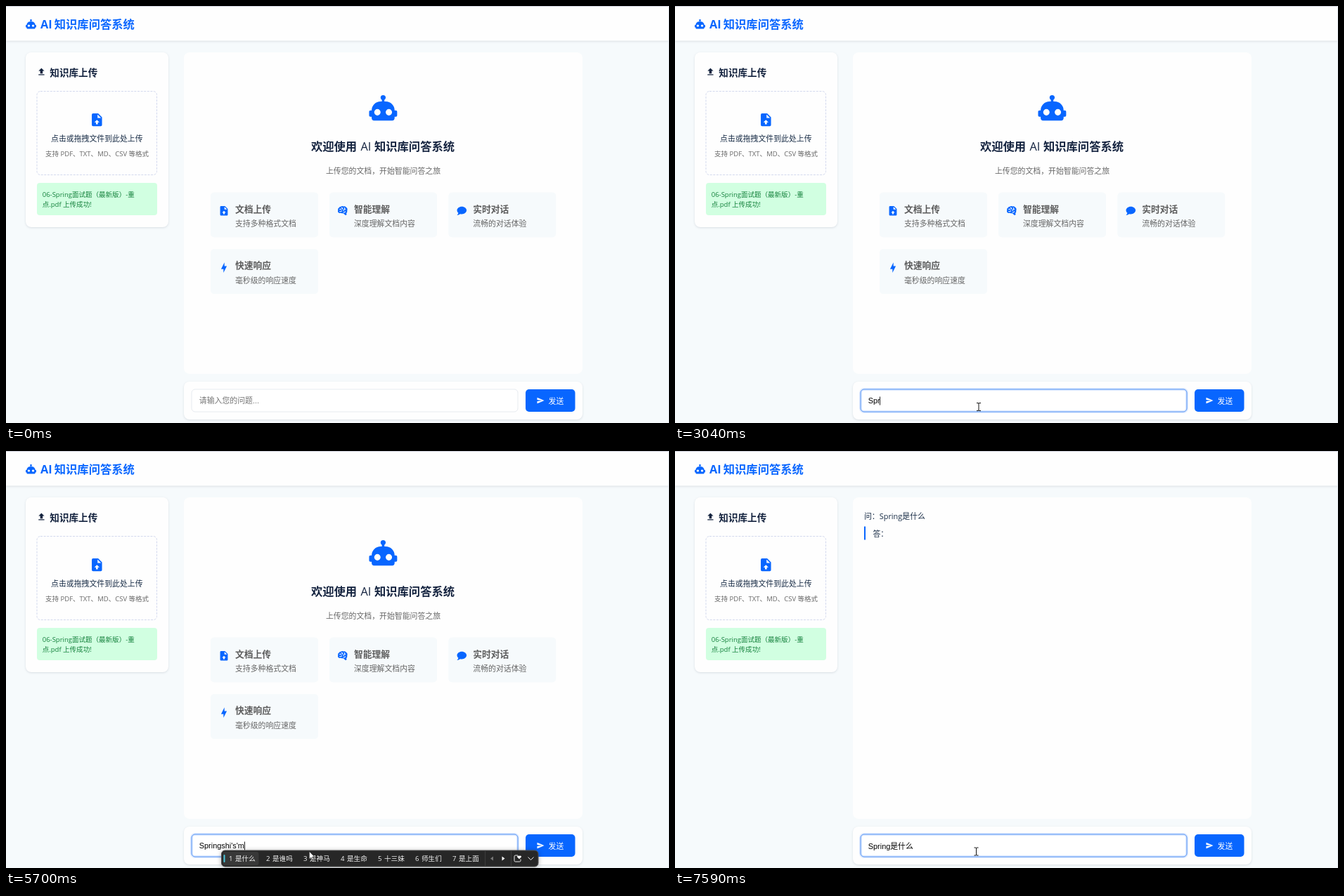
An HTML page for the animation above (8 s loop, 943 by 594 pixels).

```html
<!DOCTYPE html>
<html lang="zh-CN">
<head>
<meta charset="utf-8">
<title>AI 知识库问答系统</title>
<style>
  html, body { margin: 0; width: 100%; height: 100%; overflow: hidden; background: #f6fafc; }
  svg { display: block; }
  text { font-family: "Open Sans", "Noto Sans CJK SC", "Noto Sans CJK", sans-serif; white-space: pre; }
  .title { font-weight: 700; fill: #14233f; }
  .dark { fill: #172b45; }
  .muted { fill: #666; }
  .blue { fill: #0866ff; }
  .panel { fill: #fefefe; }
  .raised { filter: drop-shadow(0 1px 1.5px rgba(20, 40, 60, .13)); }
  .field { font-family: "Liberation Sans", "Noto Sans CJK SC", "Noto Sans CJK", sans-serif; font-size: 10.88px; }
</style>
</head>
<body>
<svg id="stage" width="943" height="594" viewBox="0 0 943 594"></svg>
<script>
const LOOP = 8000;
const stage = document.getElementById('stage');

const icons = {
  robot: 'M12 2A2 2 0 0 1 14 4C14 4.74 13.6 5.39 13 5.73V7H14A7 7 0 0 1 21 14H22A1 1 0 0 1 23 15V18A1 1 0 0 1 22 19H21V20A2 2 0 0 1 19 22H5A2 2 0 0 1 3 20V19H2A1 1 0 0 1 1 18V15A1 1 0 0 1 2 14H3A7 7 0 0 1 10 7H11V5.73C10.4 5.39 10 4.74 10 4A2 2 0 0 1 12 2M7.5 13A2.5 2.5 0 0 0 7.5 18A2.5 2.5 0 0 0 7.5 13M16.5 13A2.5 2.5 0 0 0 16.5 18A2.5 2.5 0 0 0 16.5 13',
  upload: 'M9 16V10H5L12 3L19 10H15V16H9M5 20V18H19V20H5Z',
  file: 'M14 2H6A2 2 0 0 0 4 4V20A2 2 0 0 0 6 22H18A2 2 0 0 0 20 20V8L14 2M13.5 16V19H10.5V16H8L12 12L16 16H13.5M13 9V3.5L18.5 9H13Z',
  brain: 'M8 3Q11 .8 14 2.7Q17 2 18.5 4.2Q23 6 21.2 11.8Q22 15 19.4 16.9L20.3 19.5Q18 22 16.5 20.5L14.4 18L12 16.9Q10 17.5 8 16.3Q2 17.5 1.7 12.5L2 10.4Q1 7 3.9 5.8Q5 3 8 3Z',
  chat: 'M12 3C17.5 3 22 6.58 22 11C22 15.42 17.5 19 12 19C10.76 19 9.57 18.82 8.47 18.5C5.55 21 2 21 2 21C4.33 18.67 4.7 17.1 4.75 16.5C3.05 15.07 2 13.13 2 11C2 6.58 6.5 3 12 3Z',
  bolt: 'M11 15H6L13 1V9H18L11 23V15Z',
  send: 'M2 21L23 12L2 3V10L17 12L2 14V21Z'
};

// Icons live on a 24-unit grid and are placed by their centre.
const icon = (name, cx, cy, size, cls = 'blue', extra = '') =>
  `<g transform="translate(${cx - size / 2} ${cy - size / 2}) scale(${size / 24})">
    <path class="${cls}" fill-rule="evenodd" d="${icons[name]}"/>${extra}</g>`;

// Text is placed by the vertical centre of its glyphs.
const label = (x, cy, size, content, attrs = '') =>
  `<text x="${x}" y="${cy + size * .375}" font-size="${size}" ${attrs}>${content}</text>`;

const rect = (x, y, w, h, r, attrs) =>
  `<rect x="${x}" y="${y}" width="${w}" height="${h}" rx="${r}" ${attrs}/>`;

const folds = '<path d="M5 9Q8 7 9 10M9 5.5Q12 6 11.5 9M13 12Q14 8 18 9M5 13Q9 14 10 11.5M15.5 5Q15 7 17 7.5M13 15Q16 16 17.5 13" fill="none" stroke="#f6fafc" stroke-width="1.6"/>';

const card = (x, y, name, heading, detail) =>
  rect(x, y, 153, 64, 5, 'fill="#f6fafc"') +
  icon(name, x + 19, y + 26.3, 16.3, 'blue', name === 'brain' ? folds : '') +
  label(x + 35, y + 23.3, 12.75, heading, 'font-weight="700" fill="#5c5c5c"') +
  label(x + 35, y + 44.3, 10.88, detail, 'class="muted"');

stage.innerHTML = `
  ${rect(0, 0, 943, 594, 0, 'fill="#f6fafc"')}
  ${rect(0, 0, 943, 49.5, 0, 'class="panel raised"')}
  ${rect(0, 0, 943, 1, 0, 'fill="#cfd0dc"')}
  ${rect(942, 0, 1, 594, 0, 'fill="#e6eaf0"')}
  ${icon('robot', 35.5, 25.7, 16.3)}
  ${label(49, 26.2, 16.3, 'AI<tspan x="68.8">知识库问答系统</tspan>', 'class="blue" font-weight="700"')}

  ${rect(28, 66, 203, 249, 8, 'class="panel raised"')}
  ${icon('upload', 50.4, 93.8, 14.2, 'title')}
  ${label(62.3, 94.5, 13.6, '知识库上传', 'class="title"')}
  ${rect(44, 121.5, 170.5, 119, 5, 'fill="none" stroke="#d3d9ee" stroke-dasharray="3 1.6"')}
  ${icon('file', 129.3, 162.2, 21.8)}
  ${label(129.3, 189, 10.88, '点击或拖拽文件到此处上传', 'class="dark" text-anchor="middle"')}
  ${label(56, 210.3, 9.52, '支持 PDF、TXT、MD、CSV 等格式', 'class="muted"')}
  ${rect(44, 252, 171, 46, 4, 'fill="#d1ffe1"')}
  ${label(51.7, 268, 9.52, '06-Spring面试题（最新版）-重', 'fill="#15803d"')}
  ${label(51.7, 282.5, 9.52, '点.pdf 上传成功!', 'fill="#15803d"')}

  ${rect(253, 66, 567, 458, 8, 'class="panel"')}
  <g id="welcome">
    ${icon('robot', 536.4, 145, 43.5)}
    ${label(434, 200, 16.3, '欢迎使用<tspan x="504.5" font-weight="400">AI</tspan><tspan x="524">知识库问答系统</tspan>', 'class="title"')}
    ${label(536.5, 235, 10.88, '上传您的文档，开始智能问答之旅', 'class="muted" text-anchor="middle"')}
    ${card(291, 265.5, 'file', '文档上传', '支持多种格式文档')}
    ${card(460, 265.5, 'brain', '智能理解', '深度理解文档内容')}
    ${card(629.3, 265.5, 'chat', '实时对话', '流畅的对话体验')}
    ${card(291, 346.3, 'bolt', '快速响应', '毫秒级的响应速度')}
  </g>
  <g id="answer">
    ${label(269, 93, 10.88, '问：<tspan x="290.8" font-weight="500">Spring是什么</tspan>', 'class="dark"')}
    ${rect(269, 107.5, 2, 19, 0, 'class="blue"')}
    ${label(281.5, 117.5, 10.88, '答：', 'class="dark"')}
  </g>

  ${rect(253, 535, 567, 54, 8, 'class="panel raised"')}
  ${rect(264, 546, 464, 32, 5, 'fill="#fff" stroke="#e7ebf0"')}
  <g id="focus" fill="none">
    ${rect(264, 546, 464, 32, 5, 'stroke="#0866ff" stroke-opacity=".13" stroke-width="4"')}
    ${rect(264, 546, 464, 32, 5, 'stroke="#5f9bfa"')}
  </g>
  <text id="typed" class="field" x="274.8"></text>
  <rect id="caret" y="556.5" width="1" height="12" fill="#222"/>
  ${rect(739, 546, 70.5, 32, 5, 'class="blue"')}
  ${icon('send', 760.3, 562, 11.5, 'panel')}
  ${label(771.6, 562.5, 10.88, '发送', 'fill="#fff" font-weight="500"')}

  <g id="ime"></g>
  <path id="arrow" d="M0 0V11L2.6 8.7L4.3 12.3L6 11.5L4.4 8H7.7Z" fill="#fff" stroke="#222" stroke-width=".7"/>
  <path id="beam" d="M-3 -5.5H-1Q0 -5.5 0 -4.5Q0 -5.5 1 -5.5H3M0 -4.5V4.5M-3 5.5H-1Q0 5.5 0 4.5Q0 5.5 1 5.5H3" fill="none" stroke="#111"/>`;

const part = Object.fromEntries(['welcome', 'answer', 'focus', 'typed', 'caret', 'ime', 'arrow', 'beam']
  .map(id => [id, document.getElementById(id)]));

const single = { pitch: 44.8, words: '是 说 上 三 时 四 十' };
const syllable = { pitch: 44.8, words: '是 时 使 事 十 市 式' };
const pairs = { pitch: 44.8, words: '是谁 实施 是是 试试 时尚 事实 失声' };
const phrase = { pitch: 53, words: '是什么 是谁吗 是神马 是生命 十三妹 师生们 是上面' };

// Each entry: start time, field text, caret visible, candidate list.
const typing = [
  [0, '', false], [930, '', true], [1450, '', false], [1980, '', true],
  [2450, 'S', true], [2780, 'Sp', true], [3040, 'Spr', true], [3170, 'Spri', true],
  [3370, 'Sprin', true], [3500, 'Spring', true], [4030, 'Spring', false],
  [4300, 'Springs', true], [4770, 'Spring', true], [4840, 'Spring', false],
  [5240, 'Springs', true, single], [5370, 'Springsh', true, single],
  [5510, 'Springshi', true, syllable], [5640, "Springshi's", true, pairs],
  [5700, "Springshi's'm", true, phrase], [5970, 'Spring是什么', true],
  [6510, 'Spring是什么', false], [6980, 'Spring是什么', true], [7590, 'Spring是什么', false]
];

// Each entry: time, x, y of the pointer.
const pointerPath = [
  [440, 649, 586], [790, 430, 568], [930, 430, 568], [1080, 432, 575], [1250, 432, 571],
  [7180, 432, 571], [7320, 428.5, 570.5], [LOOP, 428.5, 570.5]
];

const clamp = v => Math.max(0, Math.min(1, v));
const easeOut = v => 1 - (1 - v) ** 2;
const progress = (t, from, to) => easeOut(clamp((t - from) / (to - from)));
const show = (el, on) => el.setAttribute('visibility', on ? 'visible' : 'hidden');

function candidateBar({ pitch, words }) {
  const end = 317 + 7 * pitch;
  const items = words.split(' ').map((word, i) => {
    const x = 317 + i * pitch;
    return label(x, 580.5, 9.6, `${i + 1}<tspan x="${x + 9}">${word}</tspan>`, 'fill="#f3f3f3"');
  }).join('');
  return `<g style="filter:drop-shadow(0 1px 3px rgba(0,0,0,.3))">
      ${rect(306.5, 569, end - 306.5 + 69, 23, 5, 'fill="#272727" stroke="#505050"')}</g>
    ${rect(308.5, 571, pitch - 2, 19, 3, 'fill="#383838"')}
    ${rect(309.5, 575, 2, 11, 1, 'fill="#4cc8dc"')}${items}
    <g transform="translate(${end} 580.5)" fill="none" stroke="#eee">
      <path d="M-6.5 -11V11M30.5 -11V11" stroke="#3c3c3c"/>
      <path d="M5 -3V3L1 0Z" fill="#777" stroke="none"/>
      <path d="M17.5 -3V3L21.5 0Z" fill="#fff" stroke="none"/>
      <path d="M40 -4.5H36.5Q35 -4.5 35 -3V3Q35 4.5 36.5 4.5H42.5Q44 4.5 44 3V1"/>
      <path d="M42 .8L39 -2.2Q38.8 -5 42 -3.7Q45.2 -5 45 -2.2Z" fill="#fff" stroke="none"/>
      <path d="M54.5 -2L58.5 2L62.5 -2"/>
    </g>`;
}

function pointerAt(t) {
  const next = pointerPath.findIndex(([time]) => time > t);
  const [t0, x0, y0] = pointerPath[next - 1], [t1, x1, y1] = pointerPath[next];
  const p = progress(t, t0, t1);
  return [x0 + (x1 - x0) * p, y0 + (y1 - y0) * p];
}

let current;
function drawField(entry) {
  if (entry === current) return;
  current = entry;
  const [, text, caretOn, candidates] = entry;
  part.typed.textContent = text || '请输入您的问题...';
  part.typed.setAttribute('fill', text ? '#000' : '#757575');
  part.typed.setAttribute('y', text.endsWith('么') ? 566.8 : 566);
  const width = text ? part.typed.getComputedTextLength() : 0;
  part.caret.setAttribute('x', Math.floor(275 + width));
  show(part.caret, caretOn);
  part.ime.innerHTML = candidates ? candidateBar(candidates) : '';
}

function render(t) {
  drawField(typing.findLast(([start]) => start <= t));
  part.focus.setAttribute('opacity', progress(t, 900, 1200));
  show(part.welcome, t < 6230);
  part.answer.setAttribute('opacity', progress(t, 6230, 6580));

  const visible = t >= 440;
  const [x, y] = visible ? pointerAt(t) : [0, 0];
  const isArrow = y > 578 || (t >= 5240 && t < 6910);
  show(part.arrow, visible && isArrow);
  show(part.beam, visible && !isArrow);
  part.arrow.setAttribute('transform', `translate(${x - .7} ${y - .7})`);
  part.beam.setAttribute('transform', `translate(${x} ${y})`);
}

const start = performance.now();
function tick() {
  render((performance.now() - start) % LOOP);
  requestAnimationFrame(tick);
}
tick();
</script>
</body>
</html>
```
